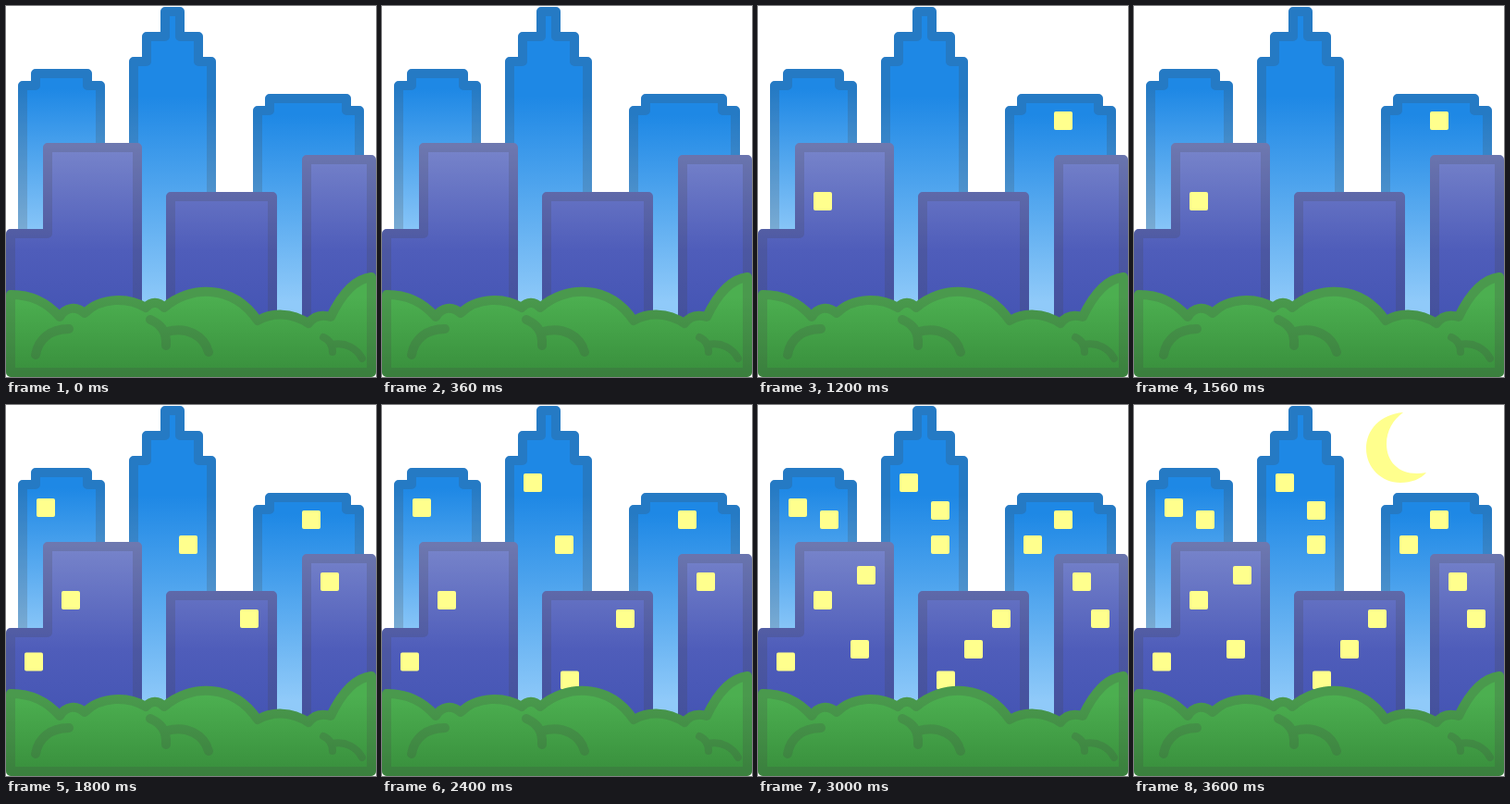
Animation of 400 by 401 pixels, one loop 4.2 s. Source, as an HTML page:

```html
<!DOCTYPE html>
<html lang="en">
<head>
<meta charset="utf-8">
<title>City lights</title>
<style>
  html, body { margin: 0; height: 100%; overflow: hidden; background: #fff; }
  svg { display: block; width: 100vw; height: 100vh; }
  path { stroke-linejoin: round; stroke-linecap: round; }
</style>
</head>
<body>
<svg id="stage" viewBox="0 0 400 401">
  <defs>
    <linearGradient id="sky1" gradientUnits="userSpaceOnUse" x1="0" y1="90" x2="0" y2="255">
      <stop stop-color="#1e88e5"/><stop offset="1" stop-color="#90caf9"/>
    </linearGradient>
    <linearGradient id="sky2" gradientUnits="userSpaceOnUse" x1="0" y1="98" x2="0" y2="325">
      <stop stop-color="#1e88e5"/><stop offset="1" stop-color="#90caf9"/>
    </linearGradient>
    <linearGradient id="sky3" gradientUnits="userSpaceOnUse" x1="0" y1="118" x2="0" y2="320">
      <stop stop-color="#1e88e5"/><stop offset="1" stop-color="#90caf9"/>
    </linearGradient>
    <linearGradient id="indigo" gradientUnits="userSpaceOnUse" x1="0" y1="148" x2="0" y2="335">
      <stop stop-color="#7986cb"/><stop offset=".62" stop-color="#4f5dba"/><stop offset="1" stop-color="#4555b4"/>
    </linearGradient>
    <linearGradient id="leaf" gradientUnits="userSpaceOnUse" x1="0" y1="315" x2="0" y2="401">
      <stop stop-color="#4caf50"/><stop offset="1" stop-color="#388e3c"/>
    </linearGradient>
  </defs>
</svg>
<script>
const stage = document.getElementById('stage');
const STEP = 600, STEPS = 7, GLOW = '#ffff8d';
const timed = [];

function add(tag, attrs, step = 0) {
  const el = document.createElementNS('http://www.w3.org/2000/svg', tag);
  for (const key in attrs) el.setAttribute(key, attrs[key]);
  stage.append(el);
  if (step) timed.push({ el, step });
}

function outline(d, width = 10) {
  add('path', { d, fill: 'none', stroke: '#424242', 'stroke-opacity': .2, 'stroke-width': width });
}

// Gradient body with a translucent dark rim
function shape(d, paint) {
  const fill = `url(#${paint})`;
  add('path', { d, fill, stroke: fill, 'stroke-width': 10 });
  outline(d);
}

shape('M18 345V86H32V73H88V86H102V345Z', 'sky1');
shape('M138 345V60H152V33H172V6H188V33H208V60H222V345Z', 'sky2');
shape('M272 345V113H285V100H368V113H382V345Z', 'sky3');
shape('M5 350V246H45V153H142V350Z', 'indigo');
shape('M178 350V206H288V350Z', 'indigo');
shape('M325 350V166H395V350Z', 'indigo');

// Windows: x, y, step at which the light comes on
[
  [60, 201, 1], [320, 114, 2],
  [33, 101, 3], [187, 141, 3], [340, 181, 3], [253, 221, 3], [20, 267.5, 3],
  [153, 74, 4], [193, 287.5, 4],
  [67, 114, 5], [187, 104, 5], [287, 141, 5], [107, 174, 5],
  [100, 254, 5], [223, 254, 5], [360, 221, 5]
].forEach(([x, y, step]) =>
  add('rect', { x, y, width: 20, height: 20, rx: 2, fill: GLOW }, step));

add('path', {
  d: 'M291 8C266 10 251 27 251 47C251 68 268 84 288 84C300 84 310 80 316 73C290 78 273 64 273 42C273 28 280 16 291 8Z',
  fill: GLOW
}, 6);

shape('M5 396V312C28 312 44 320 58 336C65 325 76 324 85 332C103 314 133 315 151 326' +
  'C157 319 165 319 171 326C198 302 245 300 272 340C288 331 308 331 327 343' +
  'C333 335 341 333 351 336C362 313 377 295 395 293V396Z', 'leaf');
outline('M32 377C35 360 48 349 68 349M156 339C167 344 174 351 173 367M174 352C195 346 214 356 219 374');
outline('M343 358C350 361 353 367 353 374M353 366C367 363 379 370 385 381', 8);

function render(now) {
  const current = Math.floor(now / STEP) % STEPS;
  for (const { el, step } of timed) {
    el.setAttribute('visibility', current >= step ? 'visible' : 'hidden');
  }
  requestAnimationFrame(render);
}
render(performance.now());
</script>
</body>
</html>
```
